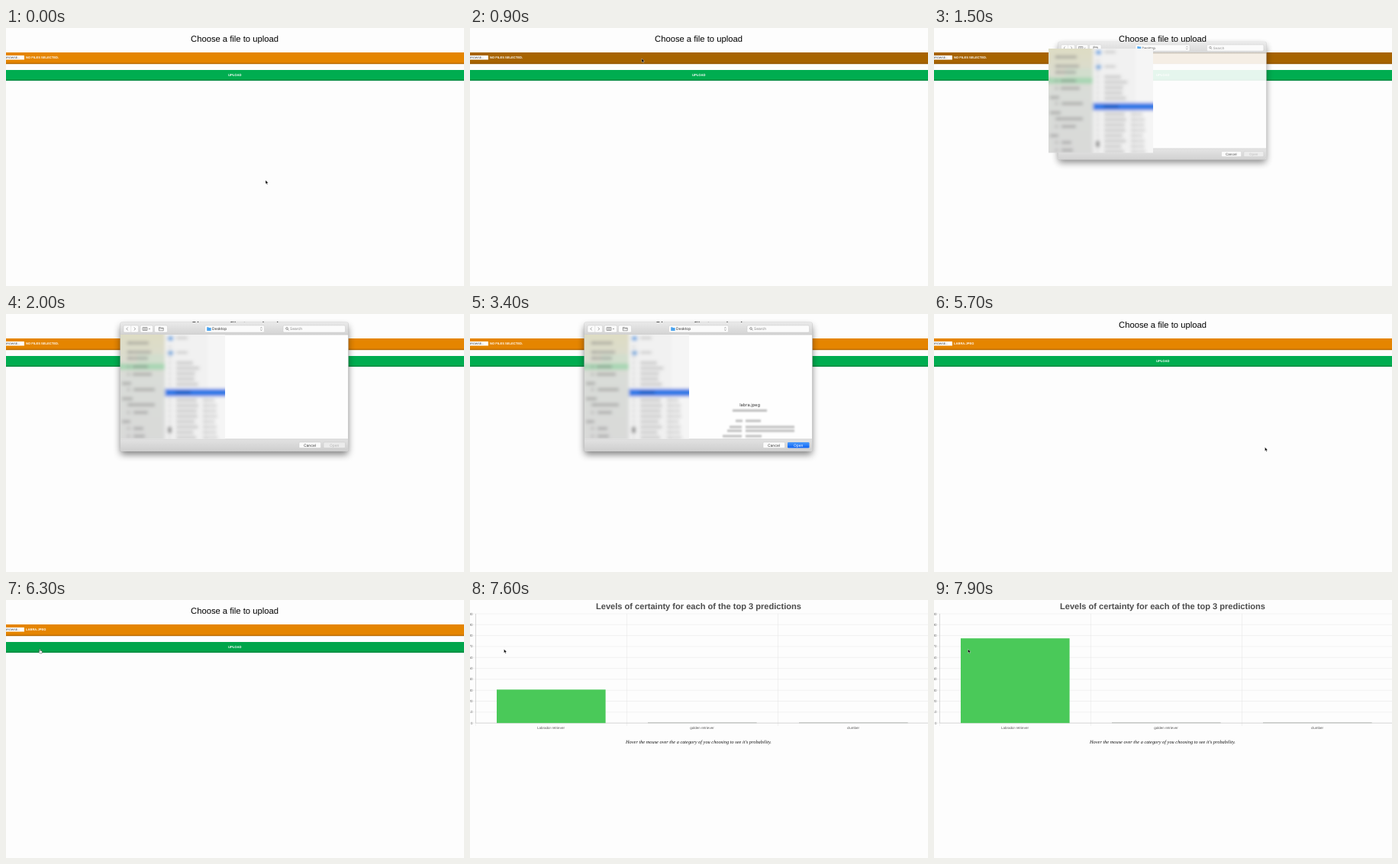
Write an HTML page that moves like this. It is 600 px wide and 338 px high and loops after 8000 ms.

```html
<!DOCTYPE html>
<html lang="en">
<head>
<meta charset="utf-8">
<title>Upload and predict</title>
<style>
  html, body { margin: 0; width: 100%; height: 100%; overflow: hidden; background: #fdfdfd; }
  svg { display: block; width: 600px; height: 338px; }
  text { font-family: "Liberation Sans", Arial, sans-serif; text-rendering: geometricPrecision; }
  .ui text { font-family: Inter, sans-serif; font-size: 4.9px; fill: #333; }
  .mid { text-anchor: middle; }
  .bold { font-weight: bold; }
</style>
</head>
<body>
<svg viewBox="0 0 600 338" xmlns="http://www.w3.org/2000/svg">
  <defs>
    <linearGradient id="chrome" x1="0" y1="0" x2="0" y2="1">
      <stop offset="0" stop-color="#e9e9e9"/><stop offset="1" stop-color="#d3d3d3"/>
    </linearGradient>
    <linearGradient id="foot" x1="0" y1="0" x2="0" y2="1">
      <stop offset="0" stop-color="#e2e2e2"/><stop offset="1" stop-color="#cecece"/>
    </linearGradient>
    <linearGradient id="blue" x1="0" y1="0" x2="0" y2="1">
      <stop offset="0" stop-color="#4c9bfb"/><stop offset="1" stop-color="#0a62f5"/>
    </linearGradient>
    <linearGradient id="side" x1="0" y1="0" x2="0" y2="1">
      <stop offset="0" stop-color="#dfdcc0"/><stop offset=".2" stop-color="#dcdcca"/>
      <stop offset=".42" stop-color="#d9dcd8"/><stop offset="1" stop-color="#d9d9d9"/>
    </linearGradient>
    <filter id="shadow" x="-20%" y="-20%" width="140%" height="150%"><feGaussianBlur stdDeviation="5"/></filter>
    <filter id="soft" x="-10%" y="-10%" width="120%" height="120%"><feGaussianBlur stdDeviation="2.1"/></filter>
    <filter id="faint" x="-10%" y="-20%" width="120%" height="140%"><feGaussianBlur stdDeviation="1.2"/></filter>
    <clipPath id="patchClip"><rect x="150" y="27" width="137" height="136.5"/></clipPath>
    <clipPath id="photoClip"><rect x="318" y="35" width="97" height="70"/></clipPath>
  </defs>

  <rect width="600" height="338" fill="#fdfdfd"/>

  <g id="form">
    <text class="mid" x="299.5" y="18" font-size="11.24">Choose a file to upload</text>
    <rect id="orange" y="32" width="600" height="15"/>
    <rect id="orangeEdge" y="45.7" width="600" height="1.5"/>
    <rect x="-2" y="36" width="26" height="5.6" rx=".6" fill="#fff"/>
    <text x="-1.2" y="40.2" font-size="3.7" fill="#333">BROWSE...</text>
    <text id="file" class="bold" x="26" y="40.2" font-size="4.1" fill="#fff"></text>
    <rect id="green" y="55" width="600" height="14"/>
    <rect y="67.6" width="600" height="1.5" fill="#008a40"/>
    <text id="upload" class="mid bold" x="299.7" y="62.9" font-size="4.15" fill="#fff">UPLOAD</text>
  </g>

  <g id="dialog" class="ui">
    <rect x="150" y="16" width="298" height="168" rx="3" fill="#000" opacity=".5" filter="url(#shadow)"/>
    <rect x="149.7" y="11" width="298.8" height="168.7" rx="2" fill="#fefefe" stroke="#a8a8a8" stroke-width=".4"/>
    <path d="M150 27V13q0-2 2-2h294q2 0 2 2v14z" fill="url(#chrome)"/>
    <path d="M150 164h298v13.5q0 2-2 2h-294q-2 0-2-2z" fill="url(#foot)"/>
    <path d="M150 27.2h298M150 163.8h298" stroke="#b9b9b9" stroke-width=".5"/>
    <g fill="#fbfbfb" stroke="#c2c2c2" stroke-width=".4">
      <rect x="154" y="15" width="19.5" height="9" rx="1.5"/>
      <rect x="176" y="15" width="16.5" height="9" rx="1.5"/>
      <rect x="194.5" y="15" width="17" height="9" rx="1.5"/>
      <rect x="260.5" y="15" width="78" height="9" rx="1.5"/>
      <rect x="363" y="15" width="81.5" height="9" rx="1.5"/>
      <rect x="384" y="168" width="28.5" height="7.5" rx="1.3"/>
      <rect id="openOff" x="416" y="168" width="28.5" height="7.5" rx="1.3" fill="#ebebeb"/>
    </g>
    <rect id="openOn" x="416" y="168" width="28.5" height="7.5" rx="1.3" fill="url(#blue)"/>
    <path d="M163.7 15v9" stroke="#c8c8c8" stroke-width=".4"/>
    <g fill="none" stroke="#666" stroke-width=".6">
      <path d="M159.6 17.6l-1.7 1.9 1.7 1.9M167.8 17.6l1.7 1.9-1.7 1.9"/>
      <path d="M179 17.7h6v3.7h-6zM181 17.7v3.7M183 17.7v3.7M187 19l1 1 1-1"/>
      <path d="M200.3 17.5h2l.7.7h3.2v3.6h-5.9zM200.3 19h5.9"/>
      <path d="M333.4 18.7l1-1.2 1 1.2M333.4 20.4l1 1.2 1-1.2"/>
      <circle cx="368" cy="19" r="1.4"/><path d="M369 20l1.5 1.6"/>
    </g>
    <path d="M263.2 17.2h2l.6.7h2.8v4h-5.4z" fill="#4aa3ee"/>
    <text x="270" y="21.3">Desktop</text>
    <text x="372" y="21.3" style="fill:#888">Search</text>
    <text class="mid" x="398" y="173.5">Cancel</text>
    <text id="openText" class="mid" x="430.2" y="173.5">Open</text>

    <g id="info">
      <text class="mid" x="366.6" y="121" style="font-size:5.7px">labra.jpeg</text>
      <g id="details" fill="#999" opacity=".55" filter="url(#faint)"></g>
    </g>
    <g id="photo" clip-path="url(#photoClip)">
      <rect x="318" y="35" width="97" height="70" fill="#252a1e"/>
      <g id="leaves"></g>
      <path d="M318 99l97-1v8h-97z" fill="#e9cf3c"/>
      <path d="M337 62q-7 1-9 8-2 6 1 14l3-1q-1-7 2-11 0 6 3 10l-3 9 1 11h7l-1-4 1-6 7-10q8 3 17 2l2 19h7l-1-3 2-12 2 14h8l-2-4-1-14q5-8 3-19l-2-8-19 2q-8 5-16 4-5-2-12-1z" fill="#e9ddc3"/>
      <path d="M341 66q12 3 25 0l9-5q8 8 5 20-12 5-21-1-10-2-18-14z" fill="#f5eedd"/>
      <path d="M373 46q3-7 11-7 9 0 12 6 2 5-1 10-3 6-9 6-9 1-13-7z" fill="#f3ead6"/>
      <path d="M374 44q-5 4-3 13 2 3 5 1l1-13zM395 43q4 2 3 9l-3 2-2-8z" fill="#dcc697"/>
      <ellipse cx="388" cy="54" rx="5" ry="4" fill="#fff8ea"/>
      <ellipse cx="389" cy="52" rx="2" ry="1.4" fill="#2a211c"/>
      <circle cx="382.5" cy="47.5" r="1" fill="#2a211c"/><circle cx="391.3" cy="47" r="1" fill="#2a211c"/>
    </g>
  </g>

  <g id="chart">
    <text class="mid bold" x="299.5" y="12.3" font-size="11.08" fill="#4c4c4c">Levels of certainty for each of the top 3 predictions</text>
    <g id="grid"></g>
    <g id="bars"></g>
    <text class="mid" x="299.5" y="187.7" font-size="6.33" font-style="italic" fill="#111" style="font-family:'Liberation Serif',serif">Hover the mouse over the a category of you choosing to see it's probability.</text>
  </g>

  <g id="cursor">
    <path id="arrow" d="M0 0v4.9l1.1-1 .8 1.8.9-.4-.8-1.7h1.6z" fill="#000" stroke="#fff" stroke-width=".35"/>
    <path id="hand" d="M-.6 0q.6-.7 1.1 0v1.9l2 .5q.7.3.5 1.2l-.5 1.9h-2.6l-1.9-2.3q.4-.8 1.4 0z" fill="#fff" stroke="#222" stroke-width=".45"/>
  </g>

  <g id="patch" clip-path="url(#patchClip)"><g filter="url(#soft)" id="blurred"></g></g>
</svg>

<script>
const LOOP = 8000, STEP = 100;
const $ = id => document.getElementById(id);
const clamp = v => Math.max(0, Math.min(1, v));
const smooth = v => v * v * (3 - 2 * v);
const show = (id, on) => $(id).setAttribute("display", on ? "inline" : "none");
const set = (id, attrs) => { for (const k in attrs) $(id).setAttribute(k, attrs[k]); };
const rect = (x, y, w, h, fill, o = 1) =>
  `<rect x="${x}" y="${y}" width="${w}" height="${h}" fill="${fill}" opacity="${o}"/>`;

let seed = 7;
const rnd = () => (seed = (seed * 16807) % 2147483647) / 2147483647;

function buildPatch() {
  let s = rect(140, 15, 68.5, 160, "url(#side)") + rect(208.5, 15, 95, 160, "#f1f1f1");
  s += rect(264, 15, 40, 160, "#f5f5f5") + rect(140, 65, 68, 8, "#a9d6b4") + rect(172, 53, 36, 12, "#cfe0cd", .7);
  const rows = [[38, 160, 27], [50, 160, 30], [58, 160, 26], [69, 166, 20], [79, 166, 25], [91, 152, 12], [99, 167, 28],
    [111, 152, 14], [119, 161, 34], [129, 167, 19], [141, 152, 11], [150, 167, 13], [160, 167, 15]];
  for (const [y, x, w] of rows) s += rect(x, y - 1.7, w, 3.4, "#777", .5) + (x > 155 ? rect(158, y - 2, 5, 4, "#888", .3) : "");
  for (const y of [32, 51]) s += rect(212, y - 3, 7, 6, "#5b9fe0", .8) + rect(223, y - 2, 15, 3, "#888", .4);
  for (let y = 43; y < 163; y += 7) {
    if (y > 95 && y < 111) continue;
    s += rect(212, y - 2, 5, 4, "#aaa", .25);
    if (y > 60) s += rect(223, y - 2, 22 + rnd() * 9, 4, "#888", .38);
    if (y > 111) s += rect(258, y - 2, 13 + rnd() * 7, 4, "#999", .35);
  }
  s += rect(212, 148, 5, 8, "#666", .7) + rect(208.5, 98, 95, 10, "#3379e6") + rect(222, 101, 20, 3.5, "#1f4fa8", .7);
  $("blurred").innerHTML = s;
}

function buildDetails() {
  const rows = [[344, 126.5, 45], [348, 140, 9], [361, 140, 20], [340, 148, 16], [361, 148, 64],
    [337, 153, 19], [361, 153, 64], [331, 160, 25], [361, 160, 21]];
  $("details").innerHTML = rows.map(([x, y, w]) => rect(x, y - 1.5, w, 3, "#888")).join("");
  let s = "";
  for (let i = 0; i < 70; i++) {
    const x = 318 + rnd() * 97, y = 35 + rnd() * 62;
    s += `<ellipse cx="${x}" cy="${y}" rx="${1 + rnd() * 2.5}" ry="${.6 + rnd()}" fill="${rnd() > .5 ? "#3d4530" : "#161a13"}"/>`;
  }
  $("leaves").innerHTML = s;
}

function buildChart() {
  let s = "", d = "";
  for (let i = 0; i <= 10; i++) {
    const y = 161.2 - i * 14.32;
    d += `M3.5 ${y}H600`;
    s += `<text x="3.4" y="${y + 1.5}" text-anchor="end" font-size="4.5" fill="#666">${i * 10}</text>`;
  }
  for (let i = 0; i < 4; i++) d += `M${7.5 + i * 198} 18V165`;
  s += `<path d="${d}" fill="none" stroke="#e4e4e4" stroke-width=".5"/><path d="M7.5 18V161.2H600" fill="none" stroke="#bdbdbd" stroke-width=".5"/>`;
  ["Labrador retriever", "golden retriever", "clumber"].forEach((name, i) => {
    s += `<text class="mid" x="${106 + i * 198}" y="169" font-size="4.5" fill="#555">${name}</text>`;
  });
  $("grid").innerHTML = s;
}

// start time, end time, destination
const moves = [[200, 900, 225, 40], [2300, 2800, 212, 101], [4200, 4900, 433.5, 174.6], [5800, 6300, 44.5, 64.4]];

function pointer(t) {
  let x = 340, y = 199.4;
  for (const [a, b, nx, ny] of moves) {
    const p = smooth(clamp((t - a) / (b - a)));
    x += (nx - x) * p;
    y += (ny - y) * p;
  }
  return [x, y];
}

function draw(t) {
  const [x, y] = pointer(t);
  const result = t >= 7600, picked = t >= 5400;
  const dialog = t > 1300 && !picked;
  show("form", !result);
  show("chart", result);
  show("dialog", dialog);
  show("patch", dialog);

  const hot = y < 47 && t < 1700;
  set("orange", { fill: hot ? "#a76300" : "#e58500" });
  set("orangeEdge", { fill: hot ? "#955800" : "#b86a00" });
  $("file").textContent = picked ? "LABRA.JPEG" : "NO FILES SELECTED.";
  const over = t > 5800 && y > 55 && y < 69 && !result;
  set("green", { fill: over ? "#00a54b" : "#00ad50" });
  set("upload", { y: t >= 6900 && t < 7100 ? 63.3 : 62.9 });

  if (dialog) {
    const q = clamp((t - 1300) / 400), k = .826 + .174 * q;
    const fade = t >= 5300 ? .5 : 1;
    set("dialog", { transform: `translate(299 95) scale(${k}) translate(-299 -95)`, opacity: Math.min(1, .4 + q) * fade });
    set("patch", { opacity: fade });
    const ready = t >= 3300;
    show("info", t >= 3000);
    show("photo", t >= 3700);
    show("openOn", ready);
    show("openOff", !ready);
    $("openText").style.fill = ready ? "#fff" : "#b5b5b5";
  }

  if (result) {
    const p = 1 - Math.pow(1 - clamp((t - 7500) / 1000), 4);
    const h = 127.5 * p;
    $("bars").innerHTML = rect(35, 161.2 - h, 142.6, h, "#4ac959") +
      [233, 431].map(bx => rect(bx, 160.5, 142.6, .7, "#a5aaa5")).join("");
  }

  set("cursor", { transform: `translate(${x} ${y})` });
  show("hand", over);
  show("arrow", !over);
}

buildPatch();
buildDetails();
buildChart();

function tick() {
  const t = performance.now() % LOOP;
  draw(Math.floor(t / STEP) * STEP);
  requestAnimationFrame(tick);
}
tick();
</script>
</body>
</html>
```
